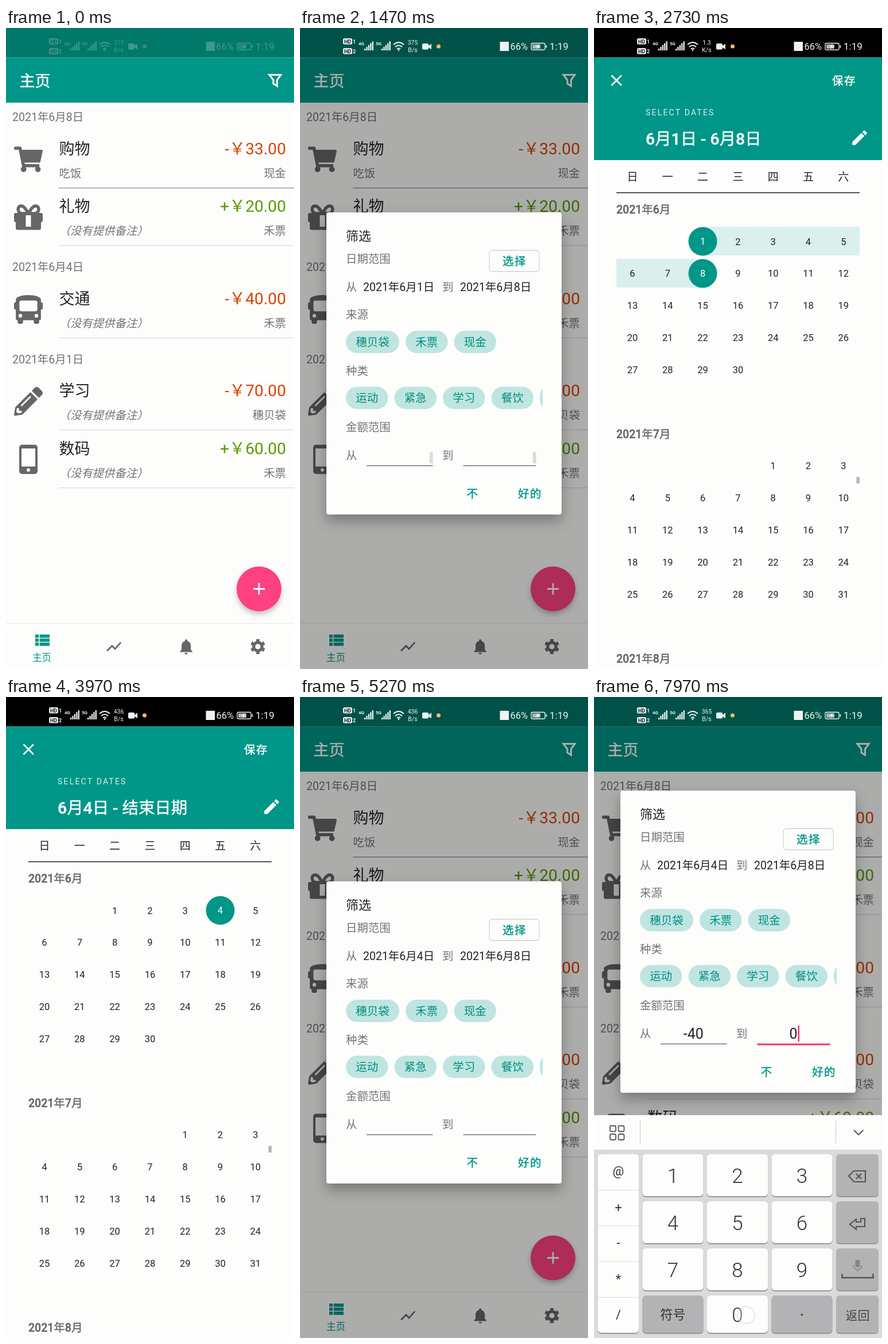
Recreate the animation shown at these times as an HTML page. Size 502 by 1116 pixels, loop 8 s.

```html
<!DOCTYPE html>
<html lang="zh-CN">
<head>
<meta charset="utf-8">
<style>
html, body { margin: 0; height: 100%; overflow: hidden; background: #fdfdfd; }
svg { display: block; width: 100vw; height: 100vh; font-family: Roboto, "Noto Sans CJK SC", "Noto Sans CJK", sans-serif; }
text { white-space: pre; fill: currentColor; }
/* a medium weight for the Chinese glyphs too */
text[font-weight="500"] { stroke: currentColor; stroke-width: .45px; }
.shade { filter: drop-shadow(0 11px 11px rgba(0,0,0,.3)); }
.fab { filter: drop-shadow(0 5px 5px rgba(0,0,0,.25)); }
</style>
</head>
<body>
<svg id="stage" viewBox="0 0 502 1116"></svg>
<script>
const TEAL = '#009688', PINK = '#ff4081', INK = '#222', GREY = '#737373', ICON = '#666', PAPER = '#fdfdfc';
const MID = 'text-anchor="middle"', END = 'text-anchor="end"', BOLD = 'font-weight="500"', WIDE = BOLD + ' letter-spacing="1.5"';

// y is the visual middle of the line
const text = (x, y, size, str, color = INK, extra = '') =>
  `<text x="${x}" y="${y + size * .36}" font-size="${size}" color="${color}" ${extra}>${str}</text>`;
const rect = (x, y, w, h, fill, r = 0, extra = '') =>
  `<rect x="${x}" y="${y}" width="${w}" height="${h}" rx="${r}" fill="${fill}" ${extra}/>`;
const dot = (x, y, r, fill, extra = '') => `<circle cx="${x}" cy="${y}" r="${r}" fill="${fill}" ${extra}/>`;
const line = (d, color, w = 2, extra = '') => `<path d="${d}" fill="none" stroke="${color}" stroke-width="${w}" ${extra}/>`;
const shape = (d, fill, x = 0, y = 0, s = 1) =>
  `<path transform="translate(${x} ${y}) scale(${s})" d="${d}" fill="${fill}" fill-rule="evenodd"/>`;
const ramp = (t, a, b) => Math.min(1, Math.max(0, (t - a) / (b - a)));

const icons = {
  cart: shape('M528 301l47-208C579 78 567 64 552 64H159l-9-45C148 8 138 0 127 0H24C11 0 0 11 0 24v16c0 13 11 24 24 24h70l70 343C147 417 136 435 136 456c0 31 25 56 56 56s56-25 56-56c0-16-6-30-17-40h210C430 426 424 440 424 456c0 31 25 56 56 56s56-25 56-56c0-22-13-41-32-50l6-25c3-15-8-29-23-29H218l-7-32h293c12 0 21-8 24-19z', ICON, 14, 206.5, .0868),
  gift: line('M39 324C34 313 29 309 25 310C19 311 20 323 28 323H50C58 323 59 311 53 310C49 309 44 313 39 324', ICON, 5.5) +
    rect(14, 322, 50, 16, ICON, 3) + rect(17, 334, 44, 17.5, ICON, 3) + rect(34.5, 326, 9, 20, PAPER),
  bus: shape('M488 128h-8V80c0-45-99-80-224-80S32 35 32 80v48h-8c-13 0-24 11-24 24v80c0 13 11 24 24 24h8v160c0 18 14 32 32 32v32c0 18 14 32 32 32h32c18 0 32-14 32-32v-32h192v32c0 18 14 32 32 32h32c18 0 32-14 32-32v-32h6c16 0 26-13 26-26V256h8c13 0 24-11 24-24v-80c0-13-11-24-24-24zM128 288c-18 0-32-14-32-32V128c0-18 14-32 32-32h256c18 0 32 14 32 32v128c0 18-14 32-32 32z', ICON, 14, 465, .0977) +
    dot(25, 501, 3.2, PAPER) + dot(53, 501, 3.2, PAPER),
  pencil: shape('M498 142l-46 46c-5 5-12 5-17 0l-111-111c-5-5-5-12 0-17l46-46c19-19 49-19 68 0l60 60c19 19 19 49 0 68zM284 100L22 362 0 484c-3 16 11 31 28 28l122-21 262-263c5-5 5-12 0-17l-111-111c-5-5-12-5-17 0zM124 340c-5-6-5-14 0-20l154-154c6-5 14-5 20 0s6 14 0 20l-154 154c-6 5-14 5-20 0zM88 424h48v36l-64 12-32-31L52 376H88z', ICON, 14, 625, .0977),
  phone: rect(23, 725.5, 32, 51, ICON, 5) + rect(27, 732, 24, 31.5, PAPER) + dot(39, 769.5, 3, PAPER)
};

const noNote = '（没有提供备注）', payA = '穗贝袋', payB = '禾票';
const entries = [
  ['cart', 210, '购物', '吃饭', '-￥33.00', '现金'],
  ['gift', 310, '礼物', noNote, '+￥20.00', payB],
  ['bus', 471, '交通', noNote, '-￥40.00', payB],
  ['pencil', 631, '学习', noNote, '-￥70.00', payA],
  ['phone', 732, '数码', noNote, '+￥60.00', payB]
];

function entry([icon, y, title, note, sum, from], i) {
  return icons[icon] + text(92.5, y, 27, title) +
    text(92.5, y + 43, 19.4, note, GREY, note === noNote ? 'font-style="italic"' : '') +
    text(488, y, 28.2, sum, sum[0] === '-' ? '#d84300' : '#5a9a00', END) +
    text(488, y + 43, 19.4, from, GREY, END) +
    rect(92, y + 68, 410, 1.2, i ? '#d9d9df' : '#858585');
}

const home = () => rect(0, 0, 502, 1116, PAPER) + rect(0, 0, 502, 51.5, '#00796b') + rect(0, 51.5, 502, 78.5, TEAL) +
  text(23.5, 92, 27, '主页', '#fff', BOLD) +
  line('M459 81.5H479L472.5 90.5V101L466 97V90.5Z', '#fff', 3) +
  [[155, 8], [416, 4], [577, 1]].map(([y, d]) => text(11, y, 19.5, `2021年6月${d}日`, GREY)).join('') +
  entries.map(entry).join('') +
  dot(441, 976.5, 39, PINK, 'class="fab"') + line('M431 976.5H451M441 966.5V986.5', '#fff', 2.8) +
  rect(0, 1036, 502, 1, '#e9e9e4') +
  [1056, 1063, 1070].map(y => rect(51, y, 6, 5.7, TEAL) + rect(58.5, y, 17.5, 5.7, TEAL)).join('') +
  text(62.5, 1096, 16.5, '主页', TEAL, MID) +
  shape('M3.5 18.5l6-6 4 4L22 6.9l-1.4-1.4-7.1 8-4-4L2 17z', ICON, 172.5, 1061.5, 1.3) +
  shape('M12 22c1.1 0 2-.9 2-2h-4c0 1.1.9 2 2 2zm6-6v-5c0-3-1.6-5.6-4.5-6.3V4c0-.8-.7-1.5-1.5-1.5s-1.5.7-1.5 1.5v.7C7.6 5.4 6 7.9 6 11v5l-2 2v1h16v-1l-2-2z', ICON, 298, 1061, 1.34) +
  dot(439, 1077, 7.3, 'none', `stroke="${ICON}" stroke-width="5.4"`) +
  dot(439, 1077, 11, 'none', `stroke="${ICON}" stroke-width="4.2" pathLength="6" stroke-dasharray=".5 .5" stroke-dashoffset="-.25"`);

function chip(x, y, w, label) {
  return rect(x, y, w, 39, '#bfe5e1', 19.5) + text(x + w / 2, y + 19.5, 19.5, label, '#008d80', MID);
}

function dialog(t) {
  const first = t < 4690 ? 1 : 4, focus = t < 6740 ? 0 : t < 7620 ? 1 : 2;
  const low = '-40'.slice(0, [7100, 7260, 7420].filter(k => t >= k).length), high = t >= 7900 ? '0' : '';
  const field = (n, x, w, value) => {
    const mid = x + w / 2, on = focus === n;
    return text(mid - .5, 743.5, 25, value, INK, MID) +
      rect(x, 761.3, w, on ? 3 : 1.5, on ? '#f23a6c' : '#777') +
      (on ? rect(mid + value.length * 7 + (value ? .5 : -1), 730, 2.5, 28, '#f23a6c') : '');
  };
  const bars = 1 - ramp(t, 1350, 1600);
  const pressed = t > 2400 && t < 4000;
  return rect(46, 321, 410, 526, PAPER, 4, 'class="shade"') +
    text(80, 362, 22, '筛选', INK) +
    [[402, '日期范围'], [451, '从'], [499.5, '来源'], [597, '种类'], [695, '金额范围'], [744, '从']]
      .map(([y, s]) => text(80, y, 19.4, s, GREY)).join('') +
    rect(330, 387, 87, 37, pressed ? '#dcefee' : PAPER, 5, `stroke="${pressed ? '#b9d5d5' : '#d4d4d4'}" stroke-width="1.3"`) +
    text(353, 406, 19.5, '选择', TEAL, WIDE) +
    text(110, 451, 19.5, `2021年6月${first}日`) + text(248, 451, 19.4, '到', GREY) + text(279, 451, 19.5, '2021年6月8日') +
    chip(80, 527, 93, payA) + chip(184, 527, 73.5, payB) + chip(268.5, 527, 73.5, '现金') +
    ['运动', '紧急', '学习', '餐饮'].map((s, i) => chip(80 + 84.5 * i, 624.5, 73.5, s)).join('') +
    shape('M423 628Q418 633 418 644T423 660Z', '#bfe5e1') +
    text(248, 744, 19.4, '到', GREY) +
    field(1, 116, 115.5, low) + field(2, 284.5, 127, high) +
    `<g opacity="${bars}">` + rect(226, 738, 5.5, 20, '#bbb') + rect(406, 738, 5.5, 20, '#bbb') + '</g>' +
    text(290.5, 811, 19.5, '不', TEAL, BOLD) + text(380, 811, 19.5, '好的', TEAL, WIDE);
}

const colX = c => 67 + 61.3 * c;

function month(y, offset, days) {
  let out = '';
  for (let d = 1; d <= days; d++) {
    const n = d + offset - 1;
    out += text(colX(n % 7), y + 55.85 * Math.floor(n / 7), 16.5, d, INK, MID);
  }
  return out;
}

function calendar(t) {
  const from = t < 3450 ? 1 : 4, to = t >= 3450 && t < 4050 ? 0 : 8;
  const mark = d => {
    const x = colX((d + 1) % 7), y = d < 6 ? 371.5 : 427.3;
    return dot(x, y, 25, TEAL) + text(x, y, 16.5, d, '#fff', MID);
  };
  const range = to ? rect(colX(from + 1), 346, 463 - colX(from + 1), 50, '#d9f0ed') + rect(39, 402, 151, 50, '#d9f0ed') : '';
  return rect(0, 51.5, 502, 1065, PAPER) + rect(0, 51.5, 502, 178.5, TEAL) +
    line('M30.5 82.5L48 100M48 82.5L30.5 100', '#fff', 2.7) +
    text(415, 91.5, 19.5, '保存', '#fff', WIDE) +
    text(90, 147, 14, 'SELECT DATES', '#d5efec', 'letter-spacing="2.2"') +
    text(90, 193, 28.4, `6月${from}日 - ${to ? '6月8日' : '结束日期'}`, '#fff', BOLD) +
    shape('M3 17.25V21h3.75L17.8 9.9l-3.75-3.75zM20.7 7c.4-.4.4-1 0-1.4l-2.3-2.3c-.4-.4-1-.4-1.4 0l-1.85 1.85 3.75 3.75z', '#fff', 446, 174, 1.42) +
    [...'日一二三四五六'].map((s, i) => text(colX(i), 259, 19, s, INK, MID)).join('') +
    rect(39, 286, 424, 1.5, '#222') +
    [316, 707, 1097.5].map((y, i) => text(39, y, 19.5, `2021年${6 + i}月`, '#666', BOLD)).join('') +
    range + month(371.7, 2, 30) + mark(from) + (to ? mark(to) : '') + month(762.3, 4, 31) +
    rect(457.5, 781.5, 5.5, 11.5, '#b5b5b5');
}

function keyboard() {
  const key = (x, y, w, h, fill) => rect(x, y + 1.8, w, h, '#8f8f8f', 6) + rect(x, y, w, h, fill, 6);
  const dark = '#b3b3b5', fg = '#555';
  let out = rect(0, 728, 502, 388, '#dadadb') + rect(0, 728, 502, 60, PAPER) +
    [28, 42.5].map(x => [746.5, 761].map(y => rect(x, y, 10, 10, 'none', 2.5, `stroke="${fg}" stroke-width="1.8"`)).join('')).join('') +
    rect(80, 737, 1, 40, '#ccc') + rect(421, 737, 1, 40, '#ccc') + line('M453 754L461 762L469.5 754', fg, 2) +
    key(7, 796, 71, 311, PAPER) +
    [858, 920, 982.5, 1045].map(y => rect(7, y, 71, 1, '#ddd')).join('') +
    [['@', 825], ['+', 889], ['-', 950], ['*', 1013], ['/', 1075]].map(([s, y]) => text(42.5, y, 22, s, '#333', MID)).join('');
  for (let r = 0; r < 4; r++) {
    const y = 796 + 82 * r, h = r < 3 ? 73 : 65;
    for (let c = 0; c < 3; c++) {
      const x = 84.5 + 112.5 * c, label = r < 3 ? r * 3 + c + 1 : ['符号', '0', '·'][c], digit = r < 3 || c === 1;
      out += key(x, y, 106, h, digit ? PAPER : dark) +
        text(x + 53, r < 3 ? y + 37 : 1075, digit ? 35 : c ? 30 : 22, label, '#333', MID + (digit ? ' font-weight="300"' : ''));
    }
    out += key(422, y, 74, h, dark);
  }
  return out + line('M444 834L453 825H473V844H453ZM457 830L466 839M466 830L457 839', fg, 2.2) +
    line('M457 909L446 918L457 927V922H472V908H465V914H457Z', fg, 2.2) +
    rect(455.5, 980, 8, 13, '#858585', 4) + line('M452 989Q453 997 459.5 997T467 989M459.5 997V1001', '#858585', 1.8) +
    line('M432.5 1004V1011H486.5V1004', fg, 2.4) + text(459.5, 1076, 21, '返回', '#444', MID);
}

const speeds = [[0, '375', 'B/s'], [1700, '1.3', 'K/s'], [3600, '436', 'B/s'], [6900, '365', 'B/s']];

function status(t) {
  const w = '#eef3f2', [, rate, unit] = speeds.filter(s => t >= s[0]).pop();
  const small = MID + ' font-weight="700"';
  const badge = (y, n) => rect(75, y, 16, 10.5, w, 2.5) + text(83, y + 5.3, 9, 'HD', '#123', small) +
    text(94.5, y + 6, 9, n, w, small);
  const signal = (x, label) => text(x - 5, 27, 8, label, w, small) +
    [0, 1, 2, 3, 4].map(i => rect(x + i * 3.4, 36 - i * 3.2, 2.3, 3 + i * 3.2, w)).join('');
  return badge(18, 1) + badge(35, 2) + signal(112, '4G') + signal(142, '5G') +
    line('M163 29Q172 21 181 29M166 33Q172 27.5 178 33M169 36.5Q172 34 175 36.5', w, 2) + dot(172, 38.5, 1.4, w) +
    text(196.5, 25.5, 10.5, rate, w, MID) + text(196.5, 38.5, 10.5, unit, w, MID) +
    rect(213, 27, 11, 10.5, w, 2) + shape('M224 31L229 27.5V37L224 34Z', w) + dot(241.5, 32, 3.5, '#f8b968') +
    rect(348.5, 24, 15.5, 16, w) + text(366.5, 32, 16.5, '66%', w) +
    rect(403, 26.5, 24, 11.5, 'none', 2.5, `stroke="${w}" stroke-width="1.3"`) + rect(405, 28.5, 14, 7.5, '#a9b8b5', 1) +
    shape('M416 28L410 33H414L412 37L419 31.5H415Z', w) + rect(428.5, 30, 1.7, 4.5, w) +
    text(435, 32, 17, '1:19', w);
}

const taps = [[840, 468, 91], [2390, 373, 406], [3430, 374, 371], [4030, 190, 427], [4660, 450, 104],
  [6690, 173, 745], [7080, 42, 951], [7240, 137, 914], [7400, 250, 1075], [7600, 347, 588], [7870, 265, 1076]];
const touch = t => taps.filter(p => t >= p[0] && t < p[0] + 130).map(([, x, y]) =>
  dot(x, y, 15, '#fff', 'fill-opacity=".3" stroke="#bcd" stroke-opacity=".5" stroke-width="1.5"')).join('');

const layers = {};
for (const name of ['home', 'ripple', 'scrim', 'dialog', 'bar', 'calendar', 'keyboard', 'status', 'touch']) {
  const g = document.createElementNS('http://www.w3.org/2000/svg', 'g');
  stage.append(layers[name] = g);
}
const fade = (name, o) => layers[name].setAttribute('opacity', o);
const shift = (name, y) => layers[name].setAttribute('transform', `translate(0 ${y})`);
const drawn = {};
function put(name, html) {
  if (drawn[name] !== html) layers[name].innerHTML = drawn[name] = html;
}

put('home', home());
put('ripple', dot(468.5, 91, 27.5, '#fff'));
put('scrim', rect(0, 0, 502, 1116, '#000'));
put('bar', rect(0, 0, 502, 51.5, '#000'));
put('keyboard', keyboard());

function frame(now) {
  const t = now % 8000;
  const rise = 1 - (1 - ramp(t, 6760, 6980)) ** 3;
  put('dialog', dialog(t));
  put('calendar', calendar(t));
  put('status', status(t));
  put('touch', touch(t));
  fade('ripple', .2 * ramp(t, 860, 950) * (1 - ramp(t, 1100, 1300)));
  fade('scrim', .32 * ramp(t, 930, 1140));
  fade('dialog', ramp(t, 900, 1075));
  fade('bar', t >= 2545 && t < 4850 ? 1 : 0);
  fade('calendar', ramp(t, 2580, 2715) * (1 - ramp(t, 4700, 4840)));
  fade('status', .25 + .75 * ramp(t, 0, 250));
  shift('dialog', -158 * rise);
  shift('keyboard', 388 * (1 - rise));
  requestAnimationFrame(frame);
}
requestAnimationFrame(frame);
</script>
</body>
</html>
```
